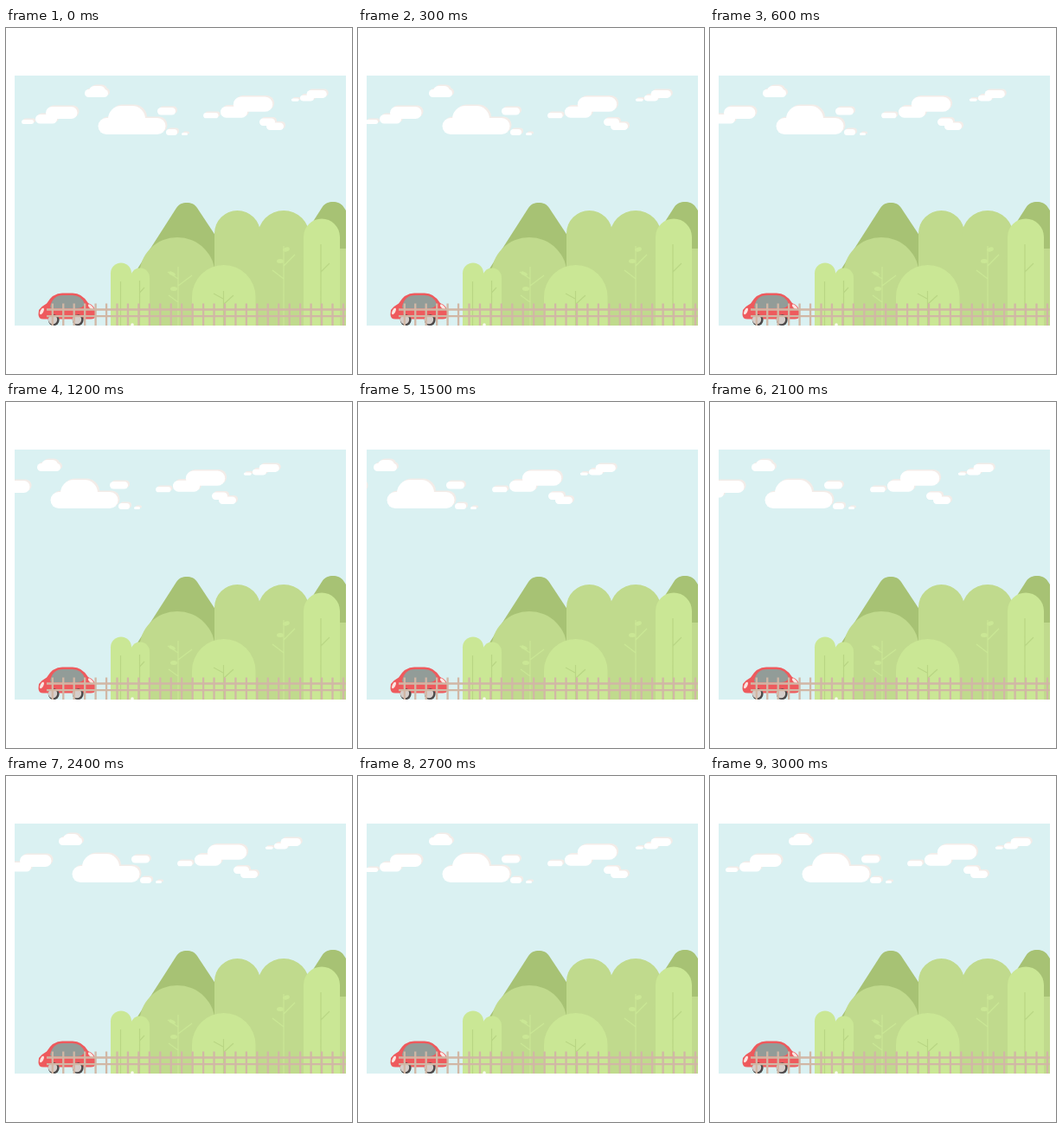
An HTML page that plays this animation: 400 by 400 pixels, repeating every 3300 ms.

```html
<!DOCTYPE html>
<html>
<head>
<meta charset="utf-8">
<style>
  html, body { margin: 0; width: 100%; height: 100%; overflow: hidden; background: #fff; }
  svg { display: block; width: 400px; height: 400px; }
</style>
</head>
<body>
<svg viewBox="0 0 400 400">
  <defs>
    <clipPath id="view"><rect x="10" y="55" width="383" height="289"/></clipPath>
    <!-- Three pills rising to the right -->
    <g id="trail">
      <rect x="-16" y="15" width="14" height="5" rx="2.5"/>
      <rect y="9" width="25" height="10.5" rx="5.2"/>
      <rect x="12" width="36.5" height="14" rx="7"/>
    </g>
    <g id="cloudShapes">
      <use href="#trail" transform="translate(34 91)"/>
      <use href="#trail" transform="translate(248 79.5) scale(1.24)"/>
      <use href="#trail" transform="translate(340 72) scale(.635)"/>
      <rect x="91" y="71" width="27" height="9" rx="4.5"/>
      <rect x="96" y="67" width="19" height="13" rx="6"/>
      <rect x="106.5" y="104" width="78" height="19" rx="9.5"/>
      <rect x="118" y="90" width="43" height="30" rx="15"/>
      <rect x="175" y="92" width="21" height="8.5" rx="4.2"/>
      <rect x="185" y="117" width="13" height="7" rx="3.5"/>
      <rect x="203" y="121" width="7" height="3" rx="1.5"/>
      <rect x="293" y="104.5" width="18" height="8.5" rx="4.2"/>
      <rect x="301" y="109.5" width="20" height="8.5" rx="4.2"/>
    </g>
    <g id="wheel">
      <circle cx="1.2" cy=".6" r="6.4" fill="#4d4a4a"/>
      <circle r="5.2" fill="#d5ceca"/>
    </g>
  </defs>
  <g clip-path="url(#view)">
    <rect x="10" y="55" width="383" height="289" fill="#daf1f2"/>
    <g id="clouds">
      <use href="#cloudShapes" x="2" y="-1.6" fill="#f3ece8"/>
      <use href="#cloudShapes" fill="#fff"/>
    </g>

    <g fill="#a7c274">
      <path d="M140 297 197 208C200 203.500 204 202 209 202S218 203.500 221 208L262 270V344H140Z"/>
      <path d="M340 247 366 206.500C369 202.500 373 201 378 201S387 202.500 390 206.500L410 237V300H340Z"/>
    </g>
    <g fill="#c0da8d">
      <rect x="241" y="211" width="53" height="160" rx="26.5"/>
      <rect x="291" y="211" width="60" height="170" rx="30"/>
      <rect x="270" y="245" width="50" height="100"/>
      <rect x="154" y="242" width="88" height="160" rx="44"/>
      <rect x="200" y="300" width="193" height="44"/>
      <rect x="340" y="255" width="86" height="140" rx="20"/>
    </g>
    <g fill="#cae795">
      <rect x="121" y="271.5" width="24" height="100" rx="12"/>
      <rect x="144" y="277.5" width="22" height="100" rx="11"/>
      <rect x="215" y="274" width="73.5" height="120" rx="36.7"/>
      <rect x="344" y="220.500" width="42" height="160" rx="21"/>
      <ellipse cx="194" cy="301.5" rx="4" ry="2.5"/>
      <ellipse cx="192" cy="284" rx="4" ry="2" transform="rotate(25 192 284)"/>
      <ellipse cx="317" cy="269.5" rx="4" ry="2.5"/>
      <ellipse cx="324" cy="256" rx="4" ry="2.5" transform="rotate(-20 324 256)"/>
    </g>
    <g fill="none" stroke-width="1.2">
      <path stroke="#cae795" d="M199 276V344M199 298L215 286M187 282L199 290M188 309L199 317M321 252V344M321 275L334 262M308 280L321 290"/>
      <path stroke="#b9d684" d="M251.500 304V344M240 307L251 313M252 319L263 309M364 250V344M364 282L374 272M132.500 293V344M154.500 292V344M154.500 306L160 300"/>
    </g>

    <path fill="#ee5a5d" d="M38 326Q42 321 47 318.500Q54 306.500 65 306.500H77Q88 306.500 95 318Q103 321 103 328V333Q103 336.500 98 336.500H43Q37.500 336.500 37.500 331Z"/>
    <path fill="#929c98" d="M51 322Q54 309 66 309H77Q87 309 91 319Q89 324 82 324H54Q51 324 51 322Z"/>
    <ellipse cx="41.500" cy="327.500" rx="1.800" ry="4" fill="#fbe6e2" transform="rotate(25 41.500 327.500)"/>
    <ellipse cx="98" cy="322.500" rx="1.600" ry="4" fill="#fbe6e2" transform="rotate(-45 98 322.500)"/>
    <use href="#wheel" x="54" y="337"/>
    <use href="#wheel" x="82" y="337"/>

    <path id="fence" fill="none" stroke="#d1b7a5" stroke-width="2.3"/>
    <circle cx="146" cy="343" r="1.8" fill="#f8faee"/>
  </g>
</svg>
<script>
  const $ = id => document.getElementById(id);

  let fence = 'M47 325.500H393M47 333.200H393';
  for (let x = 53.8; x < 393; x += 12.45) fence += `M${x} 318.500V344`;
  $('fence').setAttribute('d', fence);

  // The clouds step left, then retrace the same stops
  const stops = [0, -9, -30, -43, -55, -73];
  const STEP = 300, LOOP = 3300;

  function draw(now) {
    const i = Math.floor((now % LOOP) / STEP);
    $('clouds').setAttribute('transform', `translate(${stops[Math.min(i, 10 - i)]})`);
    requestAnimationFrame(draw);
  }
  draw(performance.now());
</script>
</body>
</html>
```
